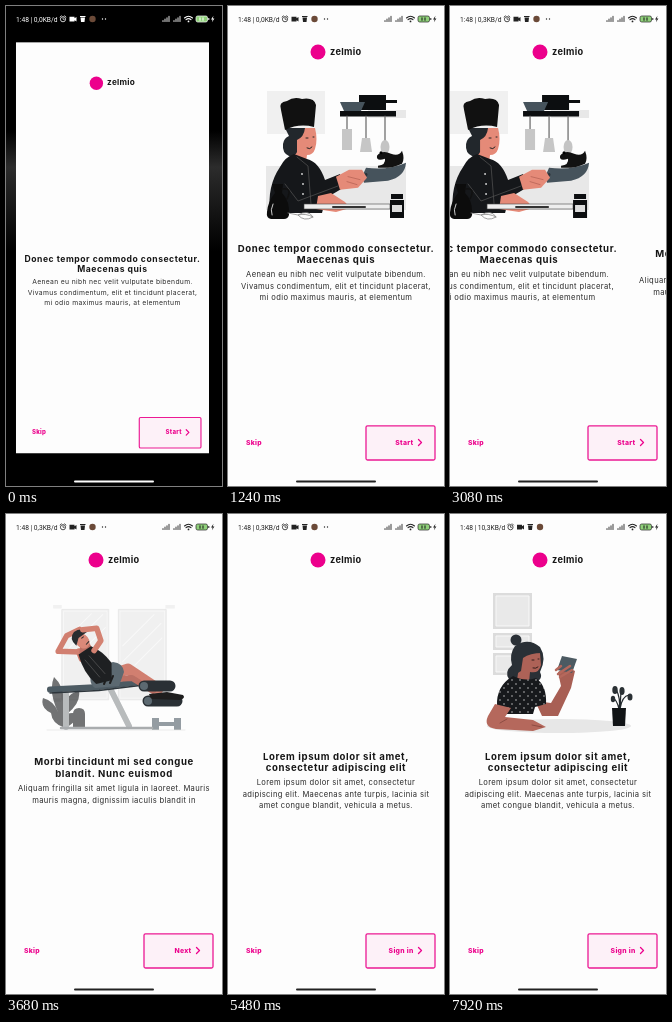
Write an HTML page that moves like this. It is 216 by 480 pixels and loops after 8 s.

```html
<!DOCTYPE html>
<html lang="la">
<head>
<meta charset="utf-8">
<style>
html, body { margin: 0; width: 100%; height: 100%; overflow: hidden; background: #000; }
svg { display: block; width: 100vw; height: 100vh; }
text { font-family: Inter, "Open Sans", sans-serif; fill: #2b2b2b; }
.title { font-size: 9.6px; font-weight: 700; letter-spacing: .6px; fill: #161616; text-anchor: middle; }
.body { font-size: 7.6px; letter-spacing: .36px; text-anchor: middle; }
.action { font-size: 6.8px; font-weight: 800; letter-spacing: .3px; fill: #ec008c; }
.brand { font-size: 9.2px; font-weight: 700; letter-spacing: .3px; fill: #161616; }
.status { font-family: Roboto, sans-serif; font-size: 6.7px; fill: currentColor; }
.line { fill: none; stroke-linecap: round; stroke-linejoin: round; }
</style>
</head>
<body>
<svg viewBox="0 0 216 480" preserveAspectRatio="none">
  <defs>
    <clipPath id="windowClip"><rect id="windowRect" width="216" height="480"/></clipPath>
    <linearGradient id="wallpaper" x2="0" y2="1">
      <stop stop-color="#000"/><stop offset=".3" stop-color="#2c2c2c"/>
      <stop offset=".6" stop-color="#191919"/><stop offset="1" stop-color="#000"/>
    </linearGradient>
    <pattern id="dots" width="8" height="8" patternUnits="userSpaceOnUse">
      <rect width="8" height="8" fill="#17191c"/>
      <circle cx="2" cy="2" r=".7" fill="#ddd"/><circle cx="6" cy="6" r=".7" fill="#ddd"/>
    </pattern>
  </defs>

  <rect width="216" height="480"/>
  <rect y="125" width="216" height="120" fill="url(#wallpaper)"/>

  <g id="window" clip-path="url(#windowClip)">
    <rect width="216" height="480" fill="#fdfdfd"/>

    <g id="page0">
      <g id="cook">
        <path d="M38 160H178V204H38Z M140 104H178V112H140Z" fill="#e8e8e8"/>
        <path d="M39 85H97V128H39Z" fill="#f0f0f0"/>
        <g id="rack">
          <path d="M112 105H168V110.5H112Z M131 89H158V104H131Z M158 94H169V97H158Z" fill="#0c0e10"/>
          <path d="M112 96H137L133 105H116Z" fill="#46535c"/>
          <path class="line" d="M119 110V126 M138 110V134 M157 110V135" stroke="#666" stroke-width="1.2"/>
          <path d="M114 123H124V144H114Z M134 132H142L144 146H132Z" fill="#c6c6c6"/>
          <ellipse cx="157" cy="141" rx="4.5" ry="7" fill="#c4c4c4"/>
        </g>
        <g id="chef">
          <path d="M68 122H87Q90 134 87 143Q85 149 79 149L78 156L66 153Z" fill="#e58a78"/>
          <path d="M57 122H77Q76 131 69 134L69 146Q67 151 61 150Q54 147 55 138Q56 132 61 130Z" fill="#22272c"/>
          <path d="M57 124L53 104Q50 96 59 95Q66 90 74 93Q86 91 88 99L86 121Q71 117 57 124Z" fill="#111"/>
          <path class="line" d="M78 132H80 M85 131H86 M79 142Q82 144 84 141" stroke="#222"/>
          <path d="M66 148L79 153Q91 156 97 174L112 168L115 182L98 192L94 207H42Q39 180 52 161Q57 151 66 148Z" fill="#15171a"/>
          <path class="line" d="M69 151L80 160L83 198 M57 178L70 195L110 180" stroke="#555" stroke-width=".7"/>
          <g fill="#ddd"><circle cx="74" cy="168" r=".9"/><circle cx="75" cy="178" r=".9"/><circle cx="75" cy="188" r=".9"/></g>
          <path d="M90 190L103 187L117 196L122 202L108 206L88 203Z" fill="#e58a78"/>
        </g>
        <g id="pan">
          <path d="M134 170L138 161Q160 164 178 156Q177 170 160 174L136 176Z" fill="#46535c"/>
          <path d="M150 159Q158 158 157 152Q148 155 149 149Q154 143 163 147Q171 150 174 144Q177 152 174 157Q164 162 150 161Z" fill="#121212"/>
          <circle cx="153" cy="146" r="1.5"/>
          <path class="line" d="M112 178L138 168" stroke="#2b3238" stroke-width="3"/>
          <path d="M108 170L121 163L134 163L139 171L130 181L112 183Z" fill="#e58a78"/>
          <path class="line" d="M120 170L132 173 M119 175L129 178" stroke="#a8584c" stroke-width=".6"/>
        </g>
        <path d="M76 198H162V203H76Z" fill="#eee" stroke="#444" stroke-width=".6"/>
        <path class="line" d="M105 201H137" stroke="#333" stroke-width="2"/>
        <path d="M44 178H55L54 187Q62 195 61 209Q60 213 56 213H43Q38 212 39 206Q40 195 47 187Z" fill="#0c0c0c"/>
        <path class="line" d="M54 183Q65 181 59 193" stroke="#111" stroke-width="1.5"/>
        <path class="line" d="M45 198Q42 204 44 209" stroke="#ccc"/>
        <path class="line" d="M60 207L70 209Q80 203 85 211Q76 216 70 209Q78 207 85 211" stroke="#888" stroke-width=".8"/>
        <path d="M162 194H176V212H162Z M163 188H175V193H163Z" fill="#0c0e10"/>
        <path d="M164 199H174V206H164Z" fill="#ddd"/>
      </g>
      <text class="title" x="108" y="245.5">Donec tempor commodo consectetur.</text>
      <text class="title" x="108" y="257">Maecenas quis</text>
      <text class="body" x="108" y="271">Aenean eu nibh nec velit vulputate bibendum.</text>
      <text class="body" x="108" y="282.5">Vivamus condimentum, elit et tincidunt placerat,</text>
      <text class="body" x="108" y="294">mi odio maximus mauris, at elementum</text>
    </g>

    <g id="page1">
      <g id="workout">
        <g id="panes">
          <path d="M38 83H48V87H38Z M167 83H178V87H167Z M36 190H47V194H36Z M166 190H178V194H166Z" fill="#e7e7e7"/>
          <g fill="#e4e4e4" stroke="#cfcfcf" stroke-width=".8">
            <path d="M48 88H102V192H48Z M113 88H168V192H113Z"/>
            <path d="M50 90H100V190H50Z M115 90H166V190H115Z" stroke="#f8f8f8"/>
          </g>
          <path class="line" d="M53 122L82 93 M54 135L95 94 M65 142L98 109 M118 130L154 94 M118 148L162 104 M132 152L163 121" stroke="#f6f6f6" stroke-width="1.2"/>
        </g>
        <g id="gear">
          <path d="M57 213Q46 209 45 199Q34 194 37 184Q48 187 52 198Q42 177 48 163Q60 174 57 194Q61 179 73 177Q75 189 61 200Q69 197 72 202Q67 211 60 213Z" fill="#101214"/>
          <path d="M67 200Q67 194 73 194Q79 194 79 200V215H67Z" fill="#101214"/>
          <path d="M146 204H153V216H146Z M168 204H175V216H168Z M153 208H168V212H153Z" fill="#4b5962"/>
          <path class="line" d="M41 216H179" stroke="#ccc" stroke-width=".7"/>
        </g>
        <path class="line" d="M60 180V213 M104 174L123 212" stroke="#b4b7b9" stroke-width="6"/>
        <path class="line" d="M55 214H146" stroke="#a4a8aa" stroke-width="2.5"/>
        <path class="line" d="M44 175.5L93 173L134 168" stroke="#43515a" stroke-width="6"/>
        <path class="line" d="M44 179L93 176.5L134 171.5" stroke="#222a30" stroke-width="1.5"/>
        <path class="line" d="M110 159L122 155L152 175" stroke="#cf7868" stroke-width="11"/>
        <path class="line" d="M110 165L126 164L147 177" stroke="#b8685b" stroke-width="6"/>
        <path d="M93 153L107 148Q117 149 118 158L113 172L89 174Q81 168 87 158Z" fill="#526069"/>
        <path class="line" d="M98 170L101 163 M104 169L107 162" stroke="#111" stroke-width="2"/>
        <g id="torso">
          <path class="line" d="M81 140L80 132" stroke="#c97060" stroke-width="6"/>
          <path class="line" d="M81 133L60 127L72 114L86 111" stroke="#cf7868" stroke-width="5.5"/>
          <path d="M80 134L83 126L92 126L95 136Z" fill="#b8685b"/>
          <ellipse cx="86" cy="123" rx="6.5" ry="8" transform="rotate(-25 86 123)" fill="#d98271"/>
          <path d="M79 126Q73 117 80 112Q88 109 93 115L83 119Z" fill="#1b1f23"/>
          <path class="line" d="M86 120L88 119 M89 127L92 125" stroke="#222"/>
          <path d="M79 135L93 130Q103 137 109 151L105 168L89 168Q79 154 79 135Z" fill="#111315"/>
          <path class="line" d="M95 135L104 127L103 114L89 112" stroke="#d27b6a" stroke-width="5.5"/>
          <path class="line" d="M84 142L94 162 M89 139L100 160" stroke="#555" stroke-width=".6"/>
        </g>
        <path class="line" d="M138 172H164 M142 187H171" stroke="#1d2429" stroke-width="11"/>
        <path d="M143 180L161 178L177 181Q180 184 174 186L145 185Z" fill="#111"/>
        <g fill="#536069"><circle cx="138" cy="172" r="4"/><circle cx="142" cy="187" r="4"/></g>
      </g>
      <text class="title" x="108" y="251">Morbi tincidunt mi sed congue</text>
      <text class="title" x="108" y="262.5">blandit. Nunc euismod</text>
      <text class="body" x="108" y="277">Aliquam fringilla sit amet ligula in laoreet. Mauris</text>
      <text class="body" x="108" y="288.5">mauris magna, dignissim iaculis blandit in</text>
    </g>

    <g id="page2">
      <g id="shelves">
        <ellipse cx="109" cy="212" rx="72" ry="7" fill="#e7e7e7"/>
        <path d="M43 79H82V115H43Z M43 119H82V136H43Z M43 139H82V161H43Z" fill="#dcdcdc"/>
        <path d="M46 82H79V112H46Z M46 122H79V133H46Z M46 142H79V158H46Z" fill="#e9e9e9" stroke="#f8f8f8"/>
      </g>
      <g id="girl">
        <path d="M65 132Q78 123 90 133Q97 144 90 158Q93 164 88 167L59 165Q54 158 62 151Q59 140 65 132Z" fill="#2a3036"/>
        <circle cx="66" cy="126" r="5.5" fill="#2a3036"/>
        <path d="M71 140Q82 130 90 139L91 151Q89 160 80 158L79 169L67 166Z" fill="#ad6257"/>
        <path d="M64 147Q66 133 79 131Q88 131 92 139Q80 139 73 144L71 157L63 162Z" fill="#2a3036"/>
        <path class="line" d="M82 146H84 M88 145H89 M83 154Q86 155 88 153" stroke="#351d1b"/>
        <path d="M85 187L101 189L111 172L108 158L117 153L125 157L121 174L108 202L92 202Z" fill="#a85f54"/>
        <path d="M63 162Q75 168 86 164Q97 172 96 190L85 193L83 200H57L47 192Q46 172 63 162Z" fill="url(#dots)"/>
        <path d="M45 190L61 194L55 203L83 206L96 213L83 217L46 215Q33 213 38 202Z" fill="#b5685c"/>
        <path class="line" d="M57 205L50 209 M82 211L92 213" stroke="#7d4139" stroke-width=".7"/>
        <path d="M112 142L127 145L122 159L107 156Z" fill="#4c5a62"/>
        <path class="line" d="M108 160L120 152 M110 163L122 156 M106 156L111 152" stroke="#b5685c" stroke-width="2.5"/>
      </g>
      <g id="vase">
        <path class="line" d="M169 195Q171 185 166 175 M170 195L171 177 M170 195Q172 182 179 181 M169 195Q167 186 163 184" stroke="#22282c" stroke-width="1.2"/>
        <g fill="#2a3034">
          <ellipse cx="165" cy="176" rx="2.7" ry="4"/><ellipse cx="172" cy="177" rx="2.6" ry="4"/>
          <ellipse cx="180" cy="183" rx="2.5" ry="3.5"/><ellipse cx="163" cy="185" rx="2.2" ry="3.2"/>
        </g>
        <path d="M162 194H176L175 212H163Z" fill="#111416"/>
      </g>
      <text class="title" x="108" y="245.5">Lorem ipsum dolor sit amet,</text>
      <text class="title" x="108" y="257">consectetur adipiscing elit</text>
      <text class="body" x="108" y="271">Lorem ipsum dolor sit amet, consectetur</text>
      <text class="body" x="108" y="282.5">adipiscing elit. Maecenas ante turpis, lacinia sit</text>
      <text class="body" x="108" y="294">amet congue blandit, vehicula a metus.</text>
    </g>

    <circle cx="90" cy="46" r="7.5" fill="#ec008c"/>
    <text class="brand" x="102" y="48.5">zelmio</text>
    <text class="action" x="18" y="438.6">Skip</text>
    <rect x="138" y="419.8" width="69" height="34.2" rx="1.5" fill="#fdf1f8" stroke="#ec1a94" stroke-width="1.3"/>
    <text class="action" id="next" x="185.5" y="438.6" text-anchor="end"></text>
    <path class="line" d="M190.5 433.5L193.5 436.5L190.5 439.5" stroke="#ec008c" stroke-width="1.3"/>
  </g>

  <g id="chrome" color="#222">
    <text class="status" id="traffic" x="10" y="15.6"></text>
    <g id="icons" fill="currentColor">
      <circle cx="57" cy="13.2" r="2.6" fill="none" stroke="currentColor" stroke-width=".8"/>
      <path class="line" d="M57 11.7V13.3H58.3 M54 11L55.3 9.7 M60 11L58.7 9.7" stroke="currentColor" stroke-width=".7"/>
      <path d="M63.5 10.8H68.5V12.3L70.5 11V15.4L68.5 14.2V15.6H63.5Z M74.5 11.5H79L78.5 16H75Z M74 10H79.5V11H74Z"/>
      <circle cx="86.5" cy="13" r="3.2" fill="#6b4a38"/>
      <g id="more"><circle cx="96.5" cy="13" r=".7"/><circle cx="99.5" cy="13" r=".7"/></g>
    </g>
    <path class="line" d="M157 15.5V14.5 M159 15.5V13.2 M161 15.5V11.8 M163 15.5V10.3 M168 15.5V14.5 M170 15.5V13.2 M172 15.5V11.8 M174 15.5V10.3" stroke="currentColor" stroke-width="1.2" opacity=".75"/>
    <path class="line" d="M178.5 12Q182.5 8.5 186.5 12 M180 13.7Q182.5 11.5 185 13.7" stroke="currentColor" stroke-width="1.1"/>
    <circle cx="182.5" cy="15.4" r=".9" fill="currentColor"/>
    <rect x="190" y="10" width="11.5" height="6" rx="1.7" fill="#8fd07a" stroke="currentColor" stroke-width=".7"/>
    <path class="line" d="M194 11.8V14.2 M197 11.8V14.2" stroke="currentColor" stroke-width="1.1"/>
    <path d="M202.3 12H203.3V14H202.3Z M207.5 9.8L205 13.5H206.6L206 16.2L208.4 12.5H206.8Z" fill="currentColor"/>
    <rect x="68" y="474.5" width="80" height="2" rx="1" fill="currentColor"/>
  </g>
</svg>
<script>
const $ = id => document.getElementById(id);
const LOOP = 8000, SLIDE = 340, SLIDE_STARTS = [2960, 4670];
const LABELS = ["Start", "Next", "Sign in"];

const ramp = (t, from, to) => Math.min(1, Math.max(0, (t - from) / (to - from)));
const easeOut = p => 1 - (1 - p) ** 3;
const easeInOut = p => p < .5 ? 4 * p ** 3 : 1 - 4 * (1 - p) ** 3;
const move = (id, transform) => $(id).setAttribute("transform", transform);
const fade = (id, alpha) => $(id).setAttribute("opacity", alpha);
const setText = (id, value) => { if ($(id).textContent !== value) $(id).textContent = value; };

function drawWindow(t) {
  const p = easeOut(ramp(t, 0, 300));
  const scale = .893 + .107 * p;
  move("window", `translate(${10 * (1 - p)} ${36.5 * (1 - p)}) scale(${scale})`);
  $("windowRect").setAttribute("height", (410.5 + 69.5 * p) / scale);
  $("chrome").setAttribute("color", t < 160 ? "#fff" : "#222");
}

function drawPages(t) {
  const scroll = SLIDE_STARTS.reduce((sum, start) => sum + easeInOut(ramp(t, start, start + SLIDE)), 0);
  for (let i = 0; i < 3; i++) move("page" + i, `translate(${216 * (i - scroll)} 0)`);
  setText("next", LABELS[Math.round(scroll)]);
}

function drawIllustrations(t) {
  fade("cook", ramp(t, 260, 460));
  fade("chef", ramp(t, 260, 570));
  move("pan", `translate(0 ${Math.sin((t - 520) / 920 * Math.PI)})`);

  fade("workout", ramp(t, 3380, 3700));
  fade("gear", ramp(t, 3400, 3850));
  fade("panes", ramp(t, 3400, 3900));
  const grow = .8 + .2 * ramp(t, 3400, 4200);
  move("panes", `translate(108 145) scale(${grow}) translate(-108 -145)`);
  const lean = -7 - 7 * Math.cos((t - 3680) / 1040 * Math.PI);
  move("torso", `rotate(${lean} 98 164)`);

  const arrive = easeInOut(ramp(t, 6500, 7400));
  const alpha = ramp(t, 6300, 7100);
  fade("girl", alpha);
  move("girl", `translate(${32 * (1 - arrive)} 0)`);
  fade("vase", alpha);
  move("vase", `translate(0 ${-8 * (1 - arrive)})`);
  fade("shelves", ramp(t, 6800, 7400));
}

function drawStatus(t) {
  const busy = t >= 7160;
  setText("traffic", `1:48 | ${busy ? "10,3" : t < 3000 ? "0,0" : "0,3"}KB/d`);
  move("icons", `translate(${busy ? 3.5 : 0} 0)`);
  fade("more", busy ? 0 : 1);
}

function draw() {
  const t = performance.now() % LOOP;
  drawWindow(t);
  drawPages(t);
  drawIllustrations(t);
  drawStatus(t);
  requestAnimationFrame(draw);
}
draw();
</script>
</body>
</html>
```
